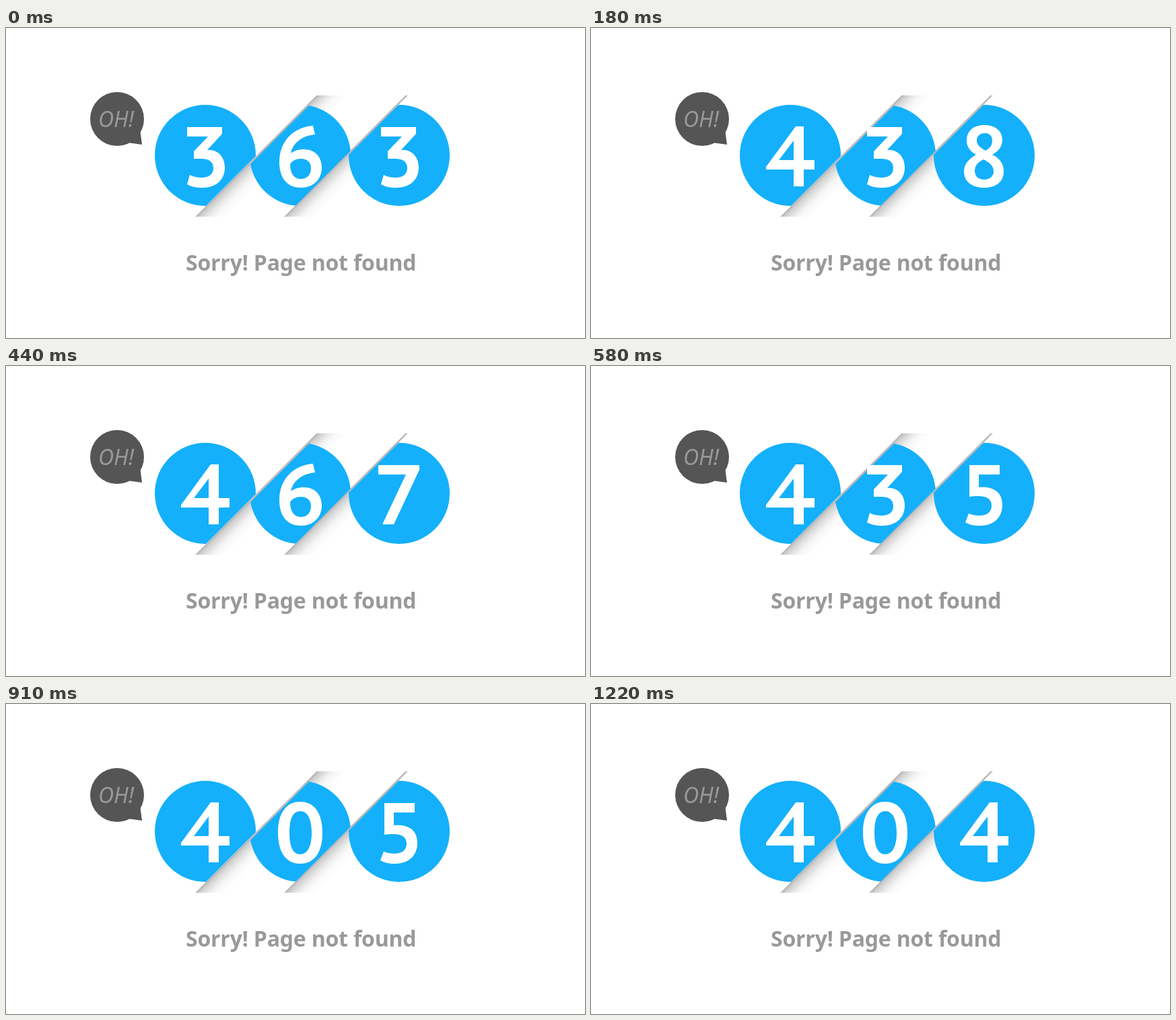
An HTML page that plays this animation: 860 by 460 pixels, repeating every 2030 ms.

```html
<!DOCTYPE html>
<html lang="en">
<head>
<meta charset="utf-8">
<title>Page not found</title>
<style>
  html, body { margin: 0; width: 100%; height: 100%; overflow: hidden; background: #fff; }
  svg { display: block; width: 860px; height: 460px; }
  text { font-family: "Noto Sans", "Open Sans", sans-serif; fill: #999; }
  .oh { font-size: 32px; font-style: italic; }
  .sorry { font-size: 32px; font-weight: 700; letter-spacing: -.2px; }
  .disc { fill: #14b0fb; }
  .digit { fill: #fff; fill-rule: evenodd; }
  .fold { stroke: #bcbab8; stroke-width: 2.6; }
</style>
</head>
<body>
<svg viewBox="0 0 860 460">
  <defs>
    <!-- Numerals: x is centred on 0, y runs from 0 (cap line) to 88 (baseline) -->
    <path id="d0" d="M0-2C21-2 33 15 33 44S21 90 0 90S-33 73-33 44S-21-2 0-2ZM0 12C-11 12-16 24-16 44S-11 76 0 76S17 64 17 44S11 12 0 12Z"/>
    <path id="d1" d="M-24 73H-4V20L-20 29L-27 19L2-1H12V73H31V88H-24Z"/>
    <path id="d2" d="M-25 8C-18 2-9-2 2-2C19-2 28 8 28 22C28 41 14 58-3 74H30V88H-29V79C-8 60 11 40 11 24C11 16 7 12-1 12C-8 12-14 15-19 19Z"/>
    <path id="d3" d="M-27 0H25V10L3 34H7C21 35 29 46 29 60C29 79 15 90-4 90C-14 90-22 88-27 85L-23 71C-17 74-11 75-5 75C5 75 12 70 12 61C12 51 5 47-6 47H-17V36L4 14H-27Z"/>
    <path id="d4" d="M-36 59L8-1H20V49H36V63H20V88H5V63H-36ZM-17 49H5V20Z"/>
    <path id="d5" d="M-22 0H23V14H-8V33C16 31 27 42 27 59C27 79 13 90-6 90C-16 90-23 88-28 85L-23 72C-18 74-13 75-7 75C4 75 11 70 11 60C11 50 3 46-9 46C-14 46-18 46-22 47Z"/>
    <path id="d6" d="M19-2L22 11C2 13-11 24-14 39C-9 35-2 33 5 33C22 33 32 44 32 60C32 78 19 90 1 90C-19 90-31 76-31 52C-31 20-9 0 19-2ZM1 47C-6 47-12 50-15 55C-15 69-9 77 1 77C10 77 16 71 16 61C16 52 10 47 1 47Z"/>
    <path id="d7" d="M-31 0H30V7L-8 88H-25L10 14H-31Z"/>
    <path id="d8" d="M0-3C17-3 27 6 27 19C27 29 21 36 12 41C23 46 29 54 29 66C29 81 18 90 0 90S-30 81-30 66C-30 54-22 47-12 41C-21 36-26 29-26 20C-26 6-16-3 0-3ZM1 9C-6 9-11 13-11 20C-11 27-5 31 2 35C9 31 12 27 12 20C12 13 8 9 1 9ZM-1 48C-9 52-14 57-14 65C-14 73-8 78 0 78S14 73 14 66C14 57 8 53-1 48Z"/>
    <use id="d9" href="#d6" transform="rotate(180 0 44)"/>

    <linearGradient id="shade" gradientUnits="userSpaceOnUse" x1="0" y1="0" x2="22" y2="22">
      <stop offset="0" stop-color="#969696" stop-opacity=".56"/>
      <stop offset=".17" stop-color="#969696" stop-opacity=".4"/>
      <stop offset=".34" stop-color="#969696" stop-opacity=".25"/>
      <stop offset=".5" stop-color="#969696" stop-opacity=".13"/>
      <stop offset=".67" stop-color="#969696" stop-opacity=".055"/>
      <stop offset="1" stop-color="#969696" stop-opacity="0"/>
    </linearGradient>
    <clipPath id="band"><path d="M200 100H680V280H200Z"/></clipPath>
    <clipPath id="left"><path d="M200 100H461L281 280H200Z"/></clipPath>
    <clipPath id="middle"><path d="M465 100H594L414 280H285Z"/></clipPath>
    <clipPath id="right"><path d="M597 100H680V280H417Z"/></clipPath>
  </defs>

  <g fill="#555">
    <circle cx="165" cy="135" r="40"/>
    <path d="M199 150L202 173L180 170Z"/>
  </g>
  <text class="oh" x="137" y="147">OH!</text>

  <g clip-path="url(#band)">
    <path fill="url(#shade)" transform="translate(373 190)" d="M90-90H140L-40 90H-90Z"/>
    <path fill="url(#shade)" transform="translate(505 190)" d="M75-75H125L-40 90H-90Z"/>
    <path class="fold" d="M468 95L278 285M600 95L410 285"/>
  </g>
  <g class="disc">
    <circle cx="296" cy="189" r="75" clip-path="url(#left)"/>
    <circle cx="437" cy="189" r="75" clip-path="url(#middle)"/>
    <circle cx="584" cy="189" r="75" clip-path="url(#right)"/>
  </g>
  <g id="code" class="digit" role="img" aria-label="404">
    <use href="#d3" x="296" y="147"/>
    <use href="#d6" x="437" y="147"/>
    <use href="#d3" x="584" y="147"/>
  </g>

  <text class="sorry" x="267" y="360">Sorry! Page not found</text>
</svg>
<script>
  const LOOP = 2030;
  // start time in ms, digits shown from then on
  const steps = [
    [0, "363"], [60, "752"], [120, "419"], [180, "438"], [250, "456"],
    [310, "429"], [380, "481"], [440, "467"], [510, "492"], [580, "435"],
    [650, "427"], [700, "405"], [840, "408"], [910, "405"], [980, "402"],
    [1030, "403"], [1100, "409"], [1160, "407"], [1220, "404"]
  ];
  const slots = document.querySelectorAll("#code use");
  const start = performance.now();
  let shown = "363";

  function draw() {
    const t = (performance.now() - start) % LOOP;
    const digits = steps.findLast(([at]) => at <= t)[1];
    if (digits !== shown) {
      slots.forEach((slot, i) => slot.setAttribute("href", "#d" + digits[i]));
      shown = digits;
    }
    requestAnimationFrame(draw);
  }
  draw();
</script>
</body>
</html>
```
